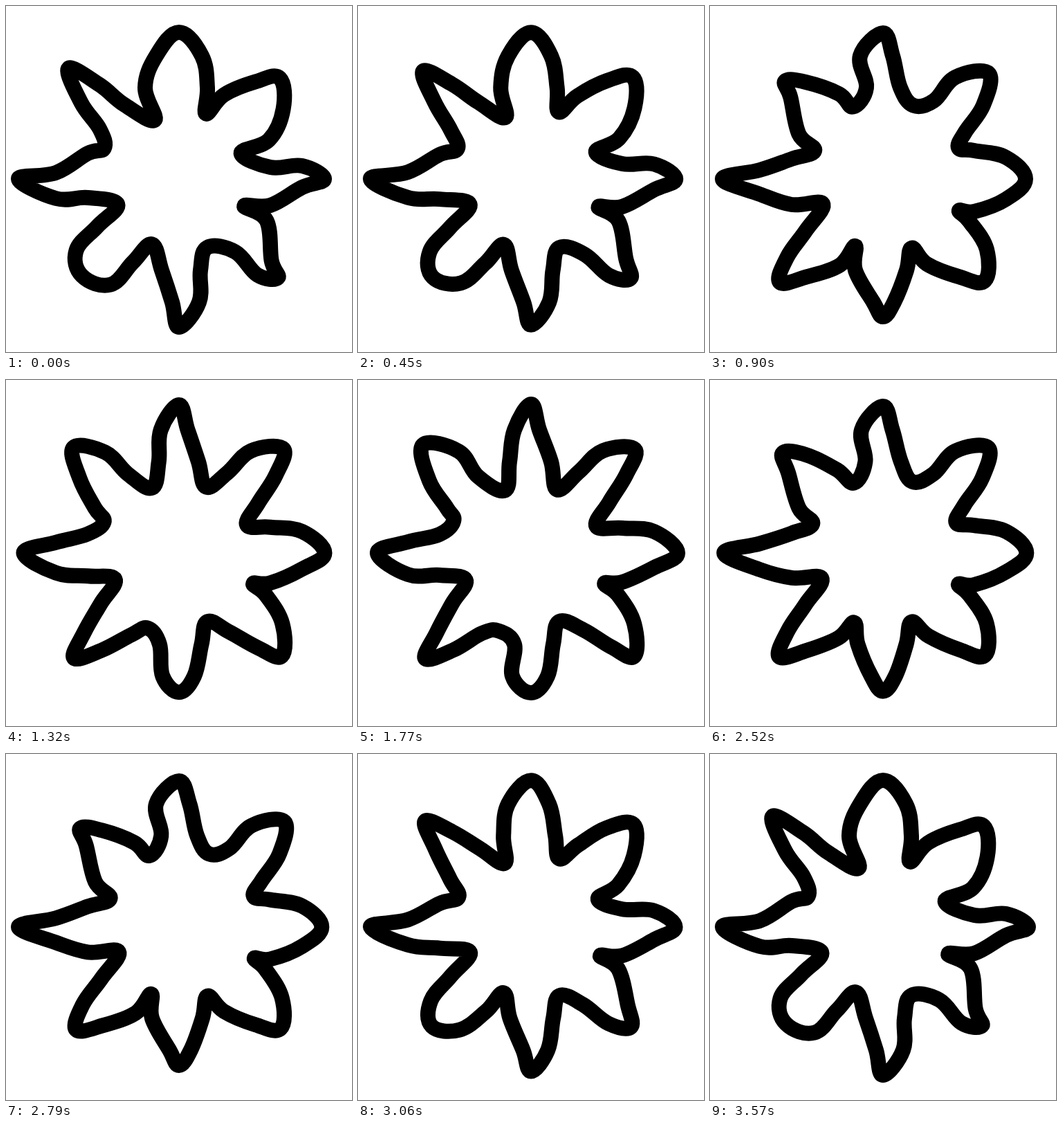
These frames come from a looping animation (500x500 px, 3600 ms). An HTML page:

```html
<!DOCTYPE html>
<html lang="en">
<head>
<meta charset="utf-8">
<title>Wobbling star</title>
<style>
  html, body { margin: 0; width: 100%; height: 100%; overflow: hidden; background: #fff; }
  svg { display: block; width: 100vw; height: 100vh; }
  path { fill: #fff; stroke: #000; stroke-width: 22; stroke-linejoin: round; }
</style>
</head>
<body>
<svg viewBox="0 0 500 500"><path id="star"/></svg>
<script>
const LOOP = 3600, CENTER = 250, ARMS = 8;
const LOW = 132, HIGH = 178;   // heights along an arm where its width is set
const ROUND = 0.19;            // handle length of the curve
const star = document.getElementById('star');

// Key poses, arms clockwise from the top. Each arm:
// valley radius, left width low and high, tip radius, right width high and low.
const poses = [
  [[92, 49, 33, 212, 33, 41], [102, 40, 21, 206, 35, 52],
   [97, 17, 19, 210, 12, 38], [102, 47, 11, 202, 18, 17],
   [107, 31, 29, 214, 10, 25], [102, 38, 38, 198, 32, 35],
   [96, 27, 28, 232, 9, 37], [117, 30, 22, 226, 15, 20]],
  [[113, 24, 33, 211, 14, 25], [115, 28, 30, 216, 27, 36],
   [118, 41, 31, 206, 29, 47], [119, 45, 34, 208, 22, 42],
   [108, 34, 16, 199, 14, 40], [105, 44, 22, 211, 18, 26],
   [94, 37, 22, 232, 13, 29], [107, 40, 11, 200, 20, 42]],
  [[98, 31, 24, 215, 12, 29], [99, 34, 31, 212, 17, 28],
   [102, 36, 31, 212, 21, 42], [115, 46, 33, 211, 14, 25],
   [107, 32, 24, 202, 27, 24], [122, 32, 20, 216, 15, 29],
   [102, 32, 31, 222, 16, 27], [121, 40, 30, 221, 30, 24]]
];

const smooth = x => x * x * (3 - 2 * x);

// A point at a height along the arm and a distance to its right.
function place(angle, along, across) {
  const s = Math.sin(angle), c = Math.cos(angle);
  return [CENTER + along * s + across * c, CENTER - along * c + across * s];
}

function armPoints([valley, l1, l2, tip, r2, r1], k) {
  const step = 2 * Math.PI / ARMS, angle = k * step;
  return [
    place(angle - step / 2, valley, 0),
    place(angle, LOW, -l1),
    place(angle, HIGH, -l2),
    place(angle, tip, 0),
    place(angle, HIGH, r2),
    place(angle, LOW, r1)
  ];
}

// u runs from the first pose (0) to the last (1).
function poseAt(u) {
  const x = u * (poses.length - 1);
  const i = Math.min(Math.floor(x), poses.length - 2);
  const f = smooth(x - i);
  return poses[i].flatMap((arm, k) =>
    armPoints(arm.map((v, j) => v + (poses[i + 1][k][j] - v) * f), k));
}

// Closed smooth curve through the points.
function outline(pts) {
  const n = pts.length, at = i => pts[(i + n) % n];
  const show = p => p.map(c => c.toFixed(2)).join(' ');
  const handle = (p, from, to) => p.map((c, k) => c + ROUND * (to[k] - from[k]));
  let d = 'M' + show(pts[0]);
  for (let i = 0; i < n; i++) {
    const [a, b, c, e] = [at(i - 1), at(i), at(i + 1), at(i + 2)];
    d += 'C' + [handle(b, a, c), handle(c, e, b), c].map(show).join(' ');
  }
  return d + 'Z';
}

function draw(now) {
  const u = (1 - Math.cos(2 * Math.PI * now / LOOP)) / 2;
  star.setAttribute('d', outline(poseAt(u)));
  requestAnimationFrame(() => draw(performance.now()));
}
draw(0);
</script>
</body>
</html>
```
